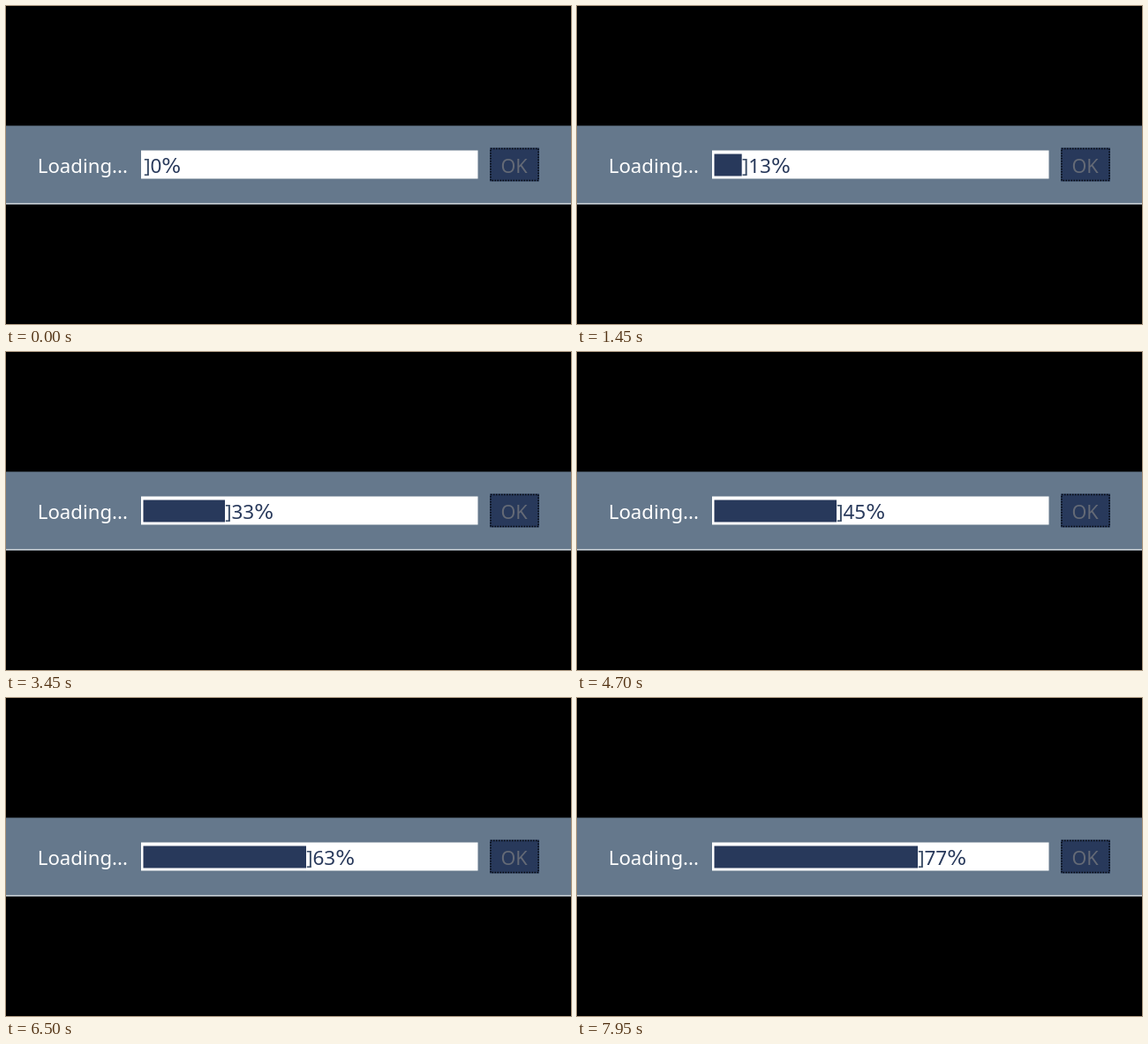
An HTML page with a canvas that plays this animation: 640 by 360 pixels, repeating every 8 s.

```html
<!DOCTYPE html>
<html lang="en">
<head>
<meta charset="utf-8">
<title>Loading</title>
<style>
html, body { margin: 0; width: 100%; height: 100%; overflow: hidden; background: #000; }
canvas { display: block; }
</style>
</head>
<body>
<canvas id="stage" width="640" height="360"></canvas>
<script>
const ctx = document.getElementById("stage").getContext("2d");
const LOOP = 8000, LAST = 77;
const SANS = '"Noto Sans", "Open Sans", sans-serif';
const WIDE = '"DejaVu Sans", sans-serif';
const NAVY = "#28395b";

function rect(x, y, w, h, color) {
  ctx.fillStyle = color;
  ctx.fillRect(x, y, w, h);
}

function text(str, x, y, size, color, family = SANS) {
  ctx.font = `${size}px ${family}`;
  ctx.fillStyle = color;
  ctx.fillText(str, x, y);
  return ctx.measureText(str).width;
}

// Moment at which the counter reaches k: one step per 100 ms, slowly
// drifting on a 50 ms grid, odd and even steps at different points.
function stepTime(k) {
  if (k === 0) return 0;
  const drift = k % 2
    ? 100 + 50 * Math.floor((k + 23) / 33)
    : 150 + (k >= 30 ? 50 : 0);
  return 100 * k + drift;
}

function percentAt(t) {
  let k = 0;
  while (k < LAST && stepTime(k + 1) <= t) k++;
  return k;
}

function drawPanel() {
  rect(0, 0, 640, 360, "#000");
  rect(0, 135.5, 640, 89, "#65788c");
  rect(0, 223, 640, 1.5, "#c9d0d6");
  text("Loading...", 35.8, 189, 22.2, "#fff");
}

function drawButton() {
  rect(548, 160.5, 56, 38, NAVY);
  ctx.strokeStyle = "#05080f";
  ctx.lineWidth = 1.5;
  ctx.setLineDash([1.5, 1.5]);
  ctx.strokeRect(549, 161.5, 54, 36);
  ctx.setLineDash([]);
  text("OK", 560.5, 188.5, 21.6, "#646a76");
}

function drawBar(percent) {
  const blocks = Math.floor(percent / 5);
  const end = 156 + blocks * 46 / 3;
  rect(153, 163.5, 381.5, 32, "#fff");
  if (blocks) rect(155.5, 167.5, end - 155.5, 25, NAVY);
  text("]", end + 0.3, 189, 22.5, "#3a4c66");
  const w = text(String(percent), end + 7.5, 189, 22.5, NAVY);
  text("%", end + 7.5 + w, 189, 23, NAVY, WIDE);
}

function frame(now) {
  drawPanel();
  drawButton();
  drawBar(percentAt(now % LOOP));
  requestAnimationFrame(frame);
}

frame(0);
</script>
</body>
</html>
```
